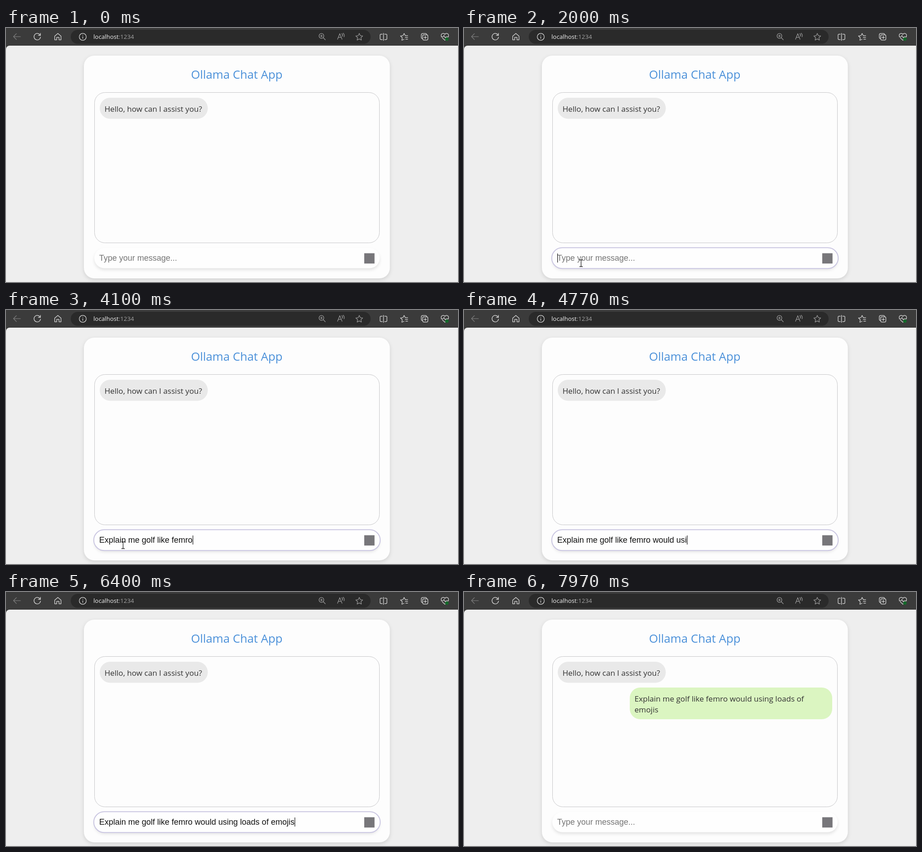
An HTML page for the animation above (8 s loop, 998 by 561 pixels).

```html
<!DOCTYPE html>
<html lang="en">
<head>
<meta charset="utf-8">
<title>Chat app</title>
<style>
  html, body { margin: 0; width: 100%; height: 100%; overflow: hidden; background: #eee; }
  svg { display: block; width: 100%; height: 100%; }
  text { font-family: "Open Sans", "Noto Sans", sans-serif; white-space: pre; }
  .message { font-size: 17.1px; fill: #333; }
  .field { font: 18px "Liberation Sans", Arial, sans-serif; }
  .icon { fill: none; stroke: #dedede; stroke-width: 1.25; stroke-linecap: round; stroke-linejoin: round; }
  .dim { stroke: #9a9a9a; }
  .card { filter: drop-shadow(0 3px 4px rgba(0, 0, 0, .12)); }
  .input { filter: drop-shadow(0 4px 3px rgba(0, 0, 0, .1)); }
</style>
</head>
<body>
<svg viewBox="0 0 998 561" preserveAspectRatio="none">
  <defs>
    <path id="star" d="M0-7.6 2.3-2.7 7.6-2 3.7 1.8 4.7 7.2 0 4.6-4.7 7.2-3.7 1.8-7.6-2-2.3-2.7Z"/>
  </defs>

  <!-- Browser bar -->
  <rect width="998" height="48" fill="#3b3b3b"/>
  <rect x="143" y="4" width="662" height="31" rx="15.5" fill="#2a2a2a"/>
  <path d="M0 561V47a8 8 0 0 1 8-8H998V561Z" fill="#eee"/>
  <g class="icon">
    <path style="stroke:#7b7b7b" d="M32 19H17M23 12.5 16.5 19 23 25.5"/>
    <path d="M75.5 16A7.2 7.2 0 1 0 76.2 20M76 11.5V16.3H71.2"/>
    <path d="M107.5 18 114.5 12 121.5 18V26H117V20.5H112V26H107.5Z"/>
    <circle cx="169.500" cy="19.500" r="7.700"/>
    <path d="M169.500 19V23M169.500 15.700V16"/>
    <g class="dim">
      <circle cx="696.500" cy="17.500" r="5.300"/>
      <path d="M700.500 21.500 705 26M694 17.500H699M696.500 15V20"/>
      <path d="M732 25 737 12.500 742 25M734 20.500H740M741.500 12.500Q744 15 743 18.500M744.500 11.500Q748 15 746.500 19.500"/>
      <use href="#star" x="780" y="19.500"/>
    </g>
    <path d="M831 13.500H828Q826 13.500 826 15.500V23.500Q826 25.500 828 25.500H831M836 13.500H839Q841 13.500 841 15.500V23.500Q841 25.500 839 25.500H836M833.500 11.500V27.500"/>
    <path d="M879 25 874 27 875 21.500 871 17.500 876.500 16.800 879 12 881.500 16.800H887M881.500 20.500H887M882.500 24.500H887"/>
    <path d="M919.500 23.500Q917 23 917 20.500V15Q917 12 920 12H926Q928.500 12 929 14.500"/>
    <rect x="920" y="15" width="11.500" height="11.500" rx="2.500"/>
    <path d="M925.800 17.800V23.700M922.800 20.800H928.800"/>
    <path d="M961.500 19C959 13 965.500 9.500 969 14C972.500 9.500 979 13 976.500 19M963.500 22 969 27 973 23M961 19.500H965L967 16.500 970 22 972 19.500H977"/>
  </g>
  <circle cx="973.500" cy="24.500" r="3.800" fill="#14692a"/>
  <text x="193" y="24" font-size="13.300" fill="#f2f2f2">localhost<tspan fill="#a3a3a3">:1234</tspan></text>

  <!-- Chat card -->
  <rect class="card" x="172" y="61" width="675.500" height="492" rx="23" fill="#fdfdfd"/>
  <text x="509.500" y="112" text-anchor="middle" font-size="25.700" fill="#4a90d9">Ollama Chat App</text>
  <rect x="195.500" y="142.500" width="629" height="332" rx="23" fill="#fdfdfd" stroke="#c6c6c8"/>
  <rect x="207" y="154" width="238.500" height="46.500" rx="23" fill="#e9e9e9"/>
  <text class="message" x="217.500" y="185">Hello, how can I assist you?</text>
  <g id="sent">
    <rect x="366" y="211" width="447" height="70" rx="23" fill="#dbf5c1"/>
    <text class="message" x="376.500" y="242.300"></text>
    <text class="message" x="376.500" y="265.700"></text>
  </g>

  <!-- Message field -->
  <rect class="input" x="195" y="486" width="630" height="44.500" rx="22.250" fill="#fefefe"/>
  <rect id="ring" x="193.800" y="485.300" width="632.400" height="46" rx="23" fill="#fefefe" stroke="#c9c5e1" stroke-width="2"/>
  <text id="typed" class="field" x="205.700" y="514"></text>
  <rect id="caret" y="498" width="1.200" height="20" fill="#111"/>
  <rect x="791" y="497.500" width="22.700" height="22.700" fill="#77767a"/>

  <g id="pointer">
    <path id="beam" d="M-3.500-7.500H-1L0-6.500 1-7.500H3.500M0-6.500V6.500M-3.500 7.500H-1L0 6.500 1 7.500H3.500" fill="none" stroke="#222" stroke-width="1.300"/>
    <path id="arrow" d="M0 0V16L4 12.500 6.500 18 9 17 6.500 11.500H11.500Z" fill="#fff" stroke="#222"/>
  </g>
</svg>
<script>
const LOOP = 8000, BLINK = 530;
const FOCUS = 1700, SUBMIT = 7660, POINTER_HIDE = 4640;
const TYPE_START = 2430, KEY_TIME = 63.8;
const LINES = ["Explain me golf like femro would using loads of", "emojis"];
const PROMPT = LINES.join(" ");
const TYPE_END = TYPE_START + PROMPT.length * KEY_TIME;

const el = id => document.getElementById(id);
const show = (id, on) => el(id).setAttribute("visibility", on ? "visible" : "hidden");
const clamp = (v, low, high) => Math.min(high, Math.max(low, v));

document.querySelectorAll("#sent text").forEach((line, i) => line.textContent = LINES[i]);

function drawField(t) {
  const focused = t >= FOCUS && t < SUBMIT;
  const count = focused ? clamp(Math.floor((t - TYPE_START) / KEY_TIME), 0, PROMPT.length) : 0;
  const typed = el("typed");
  typed.textContent = count ? PROMPT.slice(0, count) : "Type your message...";
  typed.setAttribute("fill", count ? "#111" : "#757575");

  const idleSince = count === PROMPT.length ? TYPE_END : FOCUS;
  const typing = count > 0 && count < PROMPT.length;
  const blinkOn = Math.floor((t - idleSince) / BLINK) % 2 === 0;
  show("ring", focused);
  show("caret", focused && (typing || blinkOn));
  el("caret").setAttribute("x", 206 + (count ? typed.getComputedTextLength() : 0));
}

function drawPointer(t) {
  const left = (1 - clamp((t - 300) / 500, 0, 1)) ** 3;
  const x = 258.5 + 45 * left, y = 519.5 + 50 * left;
  const visible = t >= 300 && t < POINTER_HIDE;
  const overField = y < 531;
  el("pointer").setAttribute("transform", `translate(${x} ${y})`);
  show("beam", visible && overField);
  show("arrow", visible && !overField);
}

function draw(now) {
  const t = now % LOOP;
  drawField(t);
  drawPointer(t);
  show("sent", t >= SUBMIT);
}

const start = performance.now();
function tick() {
  draw(performance.now() - start);
  requestAnimationFrame(tick);
}
tick();
</script>
</body>
</html>
```
